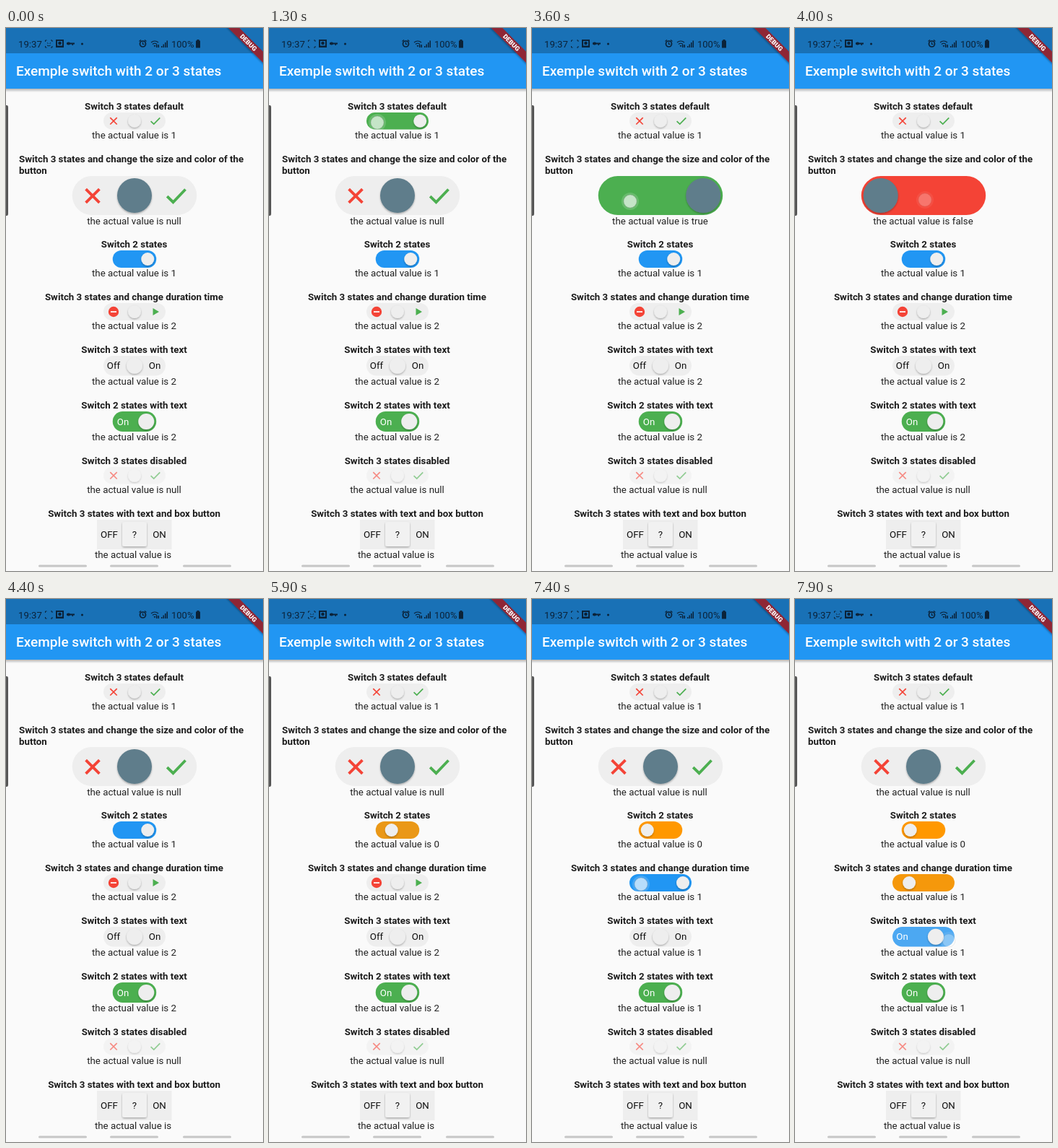
Animation of 356x752 px, one loop 8000 ms. Source, as an HTML page:

```html
<!DOCTYPE html>
<html lang="en">
<head>
<meta charset="utf-8">
<title>Switch states</title>
<style>
html, body { margin: 0; width: 100%; height: 100%; overflow: hidden; background: #fafafa; }
svg { display: block; width: 356px; height: 752px; font: 13.3px Roboto, sans-serif; fill: #222; }
.head { font-weight: 700; fill: #1c1c1c; }
.mid { text-anchor: middle; }
.line { fill: none; }
</style>
</head>
<body>
<svg id="stage" viewBox="0 0 356 752">
  <defs>
    <filter id="drop" x="-30%" y="-30%" width="160%" height="170%">
      <feDropShadow dx="0" dy="1.3" stdDeviation="1.1" flood-opacity=".32"/>
    </filter>
    <linearGradient id="fade" x2="0" y2="1">
      <stop stop-opacity=".28"/><stop offset="1" stop-opacity="0"/>
    </linearGradient>
  </defs>
  <rect width="356" height="752" fill="#fafafa"/>
  <rect y="84" width="356" height="5" fill="url(#fade)"/>
  <rect width="356" height="84" fill="#2196f3"/>
  <rect width="356" height="35" fill="#1971b6"/>
  <text x="14" y="66" font-size="19" font-weight="500" fill="#fff">Exemple switch with 2 or 3 states</text>

  <g fill="#0b2238">
    <text x="17" y="27" font-size="13.2">19:37</text>
    <path class="line" stroke="#0b2238" d="M54.500 19v-2h2M62 17h2v2M64 25v2h-2M56.500 27h-2v-2"/>
    <path id="eye" class="line" stroke="#0b2238" d="M57 20.500l1.500 1M62 20.500l-1.500 1M57 24q2.300 1.800 4.600 0"/>
    <path fill-rule="evenodd" d="M69 16h11v11h-11zM71 18v6.500h7v-6.500z"/>
    <circle cx="74.500" cy="21" r="2.300"/>
    <path d="M84 20.500q3-2 5 0h6v2h-2v1.500h-1.500v-1.500h-2.500q-2 2-5 0z"/>
    <circle cx="105.500" cy="22" r="1.500"/>
    <circle class="line" cx="189.500" cy="22" r="4" stroke="#0b2238" stroke-width="1.700"/>
    <path class="line" stroke="#0b2238" stroke-width="1.200" d="M184.500 18.500l2.500-2M194.500 18.500l-2.500-2M189.500 19.500v3h2"/>
    <path class="line" stroke="#0b2238" stroke-width="1.200" d="M201 20q5-4 10 0M203 22.500q3-2.500 6 0"/>
    <path d="M204.500 24h3l-1.500 2.500zM208 23h1.500v4h-1.500zM210.500 23h1.500v4h-1.500z"/>
    <path d="M215 25h1.500v2h-1.500zM217.500 22.500h1.500v4.500h-1.500zM220 20h1.500v7h-1.500zM222.500 17.500h1.500v9.500h-1.500z"/>
    <text x="229" y="27" font-size="13">100%</text>
    <path d="M264.500 16h3v1.500h1.500v10h-6v-10h1.500z"/>
  </g>

  <g transform="translate(356 0) rotate(45)">
    <rect x="-42" y="23" width="84" height="11" fill="#8f2536" filter="url(#drop)"/>
    <text class="mid" y="31.700" font-size="9" font-weight="900" fill="#fff">DEBUG</text>
  </g>

  <path d="M0 107h1q2 0 2 3v147q0 3-2 3h-1z" fill="#555"/>
  <g id="page"></g>
  <g fill="#c6c6c6">
    <rect x="45" y="743.500" width="67" height="3" rx="1.500"/>
    <rect x="144" y="743.500" width="67" height="3" rx="1.500"/>
    <rect x="245" y="743.500" width="67" height="3" rx="1.500"/>
  </g>
  <g id="touch">
    <circle r="12" fill="#fff" opacity=".16"/>
    <circle r="9" fill="#fff" fill-opacity=".62" stroke="#999" stroke-opacity=".35"/>
  </g>
</svg>
<script>
const LOOP = 8000, STEP = 100, CX = 178;
const GREY = [238, 238, 238], RED = [244, 67, 54], GREEN = [76, 175, 80],
      BLUE = [33, 150, 243], ORANGE = [255, 152, 0];
const page = document.getElementById('page');
const eye = document.getElementById('eye');
const touch = document.getElementById('touch');

const rgb = c => `rgb(${c.map(Math.round).join()})`;
const clamp = v => Math.max(0, Math.min(1, v));
const mix = (a, b, p) => a + (b - a) * p;

function add(tag, attrs, parent = page, text = '') {
  const el = document.createElementNS('http://www.w3.org/2000/svg', tag);
  for (const k in attrs) el.setAttribute(k, attrs[k]);
  el.textContent = text;
  return parent.appendChild(el);
}
const label = (text, x, y, fill = '#111', parent = page) =>
  add('text', { x, y, class: 'mid', fill }, parent, text);
const head = (text, y) => add('text', { x: 177.5, y, class: 'head mid' }, page, text);
const value = (v, y) => add('text', { x: 177.5, y, class: 'mid' }, page, 'the actual value is ' + v);

function cross(g, x, y, r, w) {
  add('path', { class: 'line', stroke: rgb(RED), 'stroke-width': w,
    d: `M${x - r} ${y - r}l${2 * r} ${2 * r}M${x - r} ${y + r}l${2 * r} ${-2 * r}` }, g);
}
function check(g, x, y, r, w) {
  add('path', { class: 'line', stroke: rgb(GREEN), 'stroke-width': w,
    d: `M${x - r} ${y + r * .05}l${r * .65} ${r * .63}l${r * 1.33} ${-r * 1.38}` }, g);
}
const marks = (y, k) => g => {
  cross(g, CX - 29 * k, y, k * 4.7, k > 1 ? 3.8 : 1.7);
  check(g, CX + 29 * k, y, k * 6.4, k > 1 ? 3.8 : 1.7);
};

// colors: left, middle, right; moves: [start, duration, state]
function makeSwitch({ w, y, h, r, colors, moves = [], state = 0, icons, on, thumb = '#eee' }) {
  const bar = add('rect', { x: CX - w / 2, y, width: w, height: h, rx: h / 2 });
  const idle = add('g', {});
  if (icons) icons(idle);
  const word = on && label('On', on, y + h / 2 + 4.5, '#fff');
  const knob = add('circle', { cy: y + h / 2, r, fill: thumb, filter: 'url(#drop)' });
  const reach = w / 2 - h / 2;
  return t => {
    let from = state, to = state, p = 1;
    for (const [start, dur, next] of moves) {
      if (t < start) break;
      from = to; to = next; p = clamp((t - start) / dur);
    }
    const tint = 1 - (1 - p) ** 1.8;
    bar.setAttribute('fill', rgb(colors[from + 1].map((c, i) => mix(c, colors[to + 1][i], tint))));
    knob.setAttribute('cx', CX + reach * mix(from, to, p));
    idle.setAttribute('opacity', to === 0 ? clamp(.6 + p) : from === 0 ? clamp(1 - 3 * p) : 0);
    if (word) word.setAttribute('opacity', to === 1 ? (from === 1 ? 1 : clamp(2 * p)) : 0);
  };
}

head('Switch 3 states default', 112.7);
value(1, 152.8);
add('text', { x: 18, y: 186, class: 'head' }, page, 'Switch 3 states and change the size and color of the');
add('text', { x: 18, y: 201.5, class: 'head' }, page, 'button');
const bigText = value('null', 271.8);
head('Switch 2 states', 304);
const twoText = value(1, 344.2);
head('Switch 3 states and change duration time', 377.3);
const shared = [417, 494, 571].map(y => value(2, y));
head('Switch 3 states with text', 450);
head('Switch 2 states with text', 526.7);
head('Switch 3 states disabled', 603.8);
value('null', 643.8);
head('Switch 3 states with text and box button', 677);
value('', 733.8).setAttribute('x', 176);

const triple = [RED, GREY, GREEN];
const switches = [
  makeSwitch({ w: 86, y: 117, h: 23.5, r: 9, colors: triple, icons: marks(128.8, 1),
    moves: [[340, 250, 1], [1430, 250, -1], [2495, 250, 0]] }),
  makeSwitch({ w: 172.5, y: 205, h: 54, r: 24, colors: triple, icons: marks(232.5, 2), thumb: '#5f7d8b',
    moves: [[3060, 250, 1], [3680, 250, -1], [4130, 250, 0]] }),
  makeSwitch({ w: 60.5, y: 308, h: 24, r: 9, colors: [ORANGE, GREY, BLUE], state: 1,
    moves: [[5718, 250, -1]] }),
  makeSwitch({ w: 86, y: 381, h: 24, r: 9, colors: [ORANGE, GREY, BLUE],
    moves: [[6690, 600, 1], [7408, 600, -1]],
    icons: g => {
      add('circle', { cx: 149, cy: 393, r: 7.2, fill: rgb(RED) }, g);
      add('path', { d: 'M145 392.2h8v1.700h-8z', fill: '#fff' }, g);
      add('path', { d: 'M203.500 388v10l8.500-5z', fill: rgb(GREEN) }, g);
    } }),
  makeSwitch({ w: 86, y: 454, h: 27.5, r: 11, colors: [RED, GREY, BLUE], on: 148.5,
    moves: [[7755, 250, 1]],
    icons: g => { label('Off', 149, 472.3, '#111', g); label('On', 206, 472.3, '#111', g); } }),
  makeSwitch({ w: 60.5, y: 531, h: 28, r: 11, colors: triple, state: 1, on: 162 })
];

const off = add('g', { opacity: .6 });
add('rect', { x: 135, y: 608, width: 86, height: 23.5, rx: 11.7, fill: '#efefef' }, off);
marks(619.8, 1)(off);
add('circle', { cx: CX, cy: 619.8, r: 9, fill: '#f0f0f0', filter: 'url(#drop)' }, off);

add('rect', { x: 126, y: 681, width: 103.5, height: 41, fill: '#eee' });
add('rect', { x: 161, y: 684, width: 34, height: 34, rx: 3, fill: '#f1f1f1', filter: 'url(#drop)' });
label('OFF', 143, 705.5);
label('?', 178, 705.5);
label('ON', 212.5, 705.5);

// x, y, down, up
const taps = [
  [207, 131, 120, 340], [150, 131, 1200, 1430], [193, 138, 2350, 2480],
  [236, 236, 2880, 3060], [136, 240, 3480, 3680], [180, 238, 3960, 4130],
  [197, 333, 4600, 4750], [162, 322, 5480, 5690], [207, 395, 6490, 6690],
  [151, 395, 7220, 7400], [213, 473, 7600, 7800]
];

const setValue = (el, v) => { el.textContent = 'the actual value is ' + v; };

function draw(t) {
  switches.forEach(s => s(t));
  setValue(bigText, t < 3060 || t >= 4130 ? 'null' : t < 3680);
  setValue(twoText, t < 5718 ? 1 : 0);
  shared.forEach(el => setValue(el, t < 6690 ? 2 : 1));
  const phase = t % 1000;
  eye.setAttribute('opacity', phase >= 200 && phase < 700 ? 0 : 1);

  const tap = taps.find(([, , down, up]) => t >= down && t < up + 200);
  let alpha = 0;
  if (tap) {
    const [x, y, down, up] = tap;
    alpha = Math.min(clamp((t - down) / 100), clamp(1 - (t - up) / 200));
    touch.setAttribute('transform', `translate(${x} ${y})`);
  }
  touch.setAttribute('opacity', alpha);
}

const begin = performance.now();
function tick(now) {
  const t = Math.max(0, now - begin) % LOOP;
  draw(Math.floor(t / STEP) * STEP);
  requestAnimationFrame(tick);
}
draw(0);
requestAnimationFrame(tick);
</script>
</body>
</html>
```
